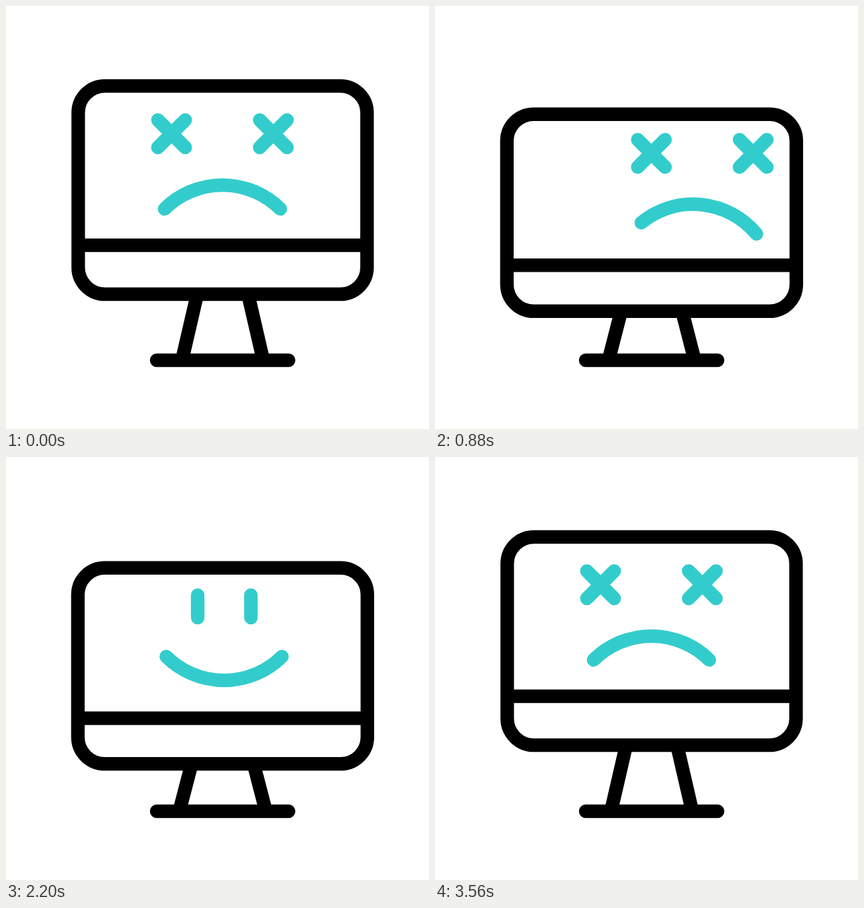
These frames come from a looping animation (640x640 px, 3600 ms). An HTML page with a canvas:

```html
<!DOCTYPE html>
<html lang="en">
<head>
<meta charset="utf-8">
<title>Computer mood</title>
<style>
  html, body { margin: 0; height: 100%; overflow: hidden; background: #fff; }
  canvas { display: block; width: 100vmin; height: 100vmin; }
</style>
</head>
<body>
<canvas width="640" height="640"></canvas>
<script>
const ctx = document.querySelector('canvas').getContext('2d');
const LOOP = 3600, TEAL = '#33cccc', CX = 327.75;
const RADIUS = 124.3, HALF_ANGLE = 0.781, FACE_GAP = 373;

// Centre lines of the strokes, plus the vertical shift of the face
const REST   = { width: 437,   top: 121,   bar: 362,   bottom: 436,   base: 536, hip: 38.4, foot: 61.5, face: 0 };
const SQUASH = { width: 438,   top: 168.6, bar: 395.8, bottom: 464.7, base: 536, hip: 47,   foot: 65.6, face: 33 };
const PEAK   = { width: 418.5, top: 100.7, bar: 340.5, bottom: 415,   base: 512, hip: 34.2, foot: 47.9, face: -17 };

const HOP = [[40, REST], [430, SQUASH], [626, PEAK], [822, SQUASH], [1120, REST]];
const SLIDE = [[623, 0], [1506, FACE_GAP], [2427, FACE_GAP], [3235, 0]];
const TILT = [[60, 0], [500, 7], [623, 7], [1506, 0], [2427, 0], [3120, 7.1], [3560, 0]];
const SMILE_SIZE = [[620, 0.68], [1580, 1]];

const clamp = (v, lo, hi) => Math.min(hi, Math.max(lo, v));
const mix = (a, b, k) => a + (b - a) * k;

// Eased position between keys: the two values around t and the blend
function between(keys, t) {
  let i = 0;
  while (i < keys.length - 2 && t > keys[i + 1][0]) i++;
  const [t0, a] = keys[i], [t1, b] = keys[i + 1];
  const x = clamp((t - t0) / (t1 - t0), 0, 1);
  return [a, b, x * x * (3 - 2 * x)];
}
const track = (keys, t) => mix(...between(keys, t));

function poseAt(t) {
  const [a, b, k] = between(HOP, t);
  return Object.fromEntries(Object.keys(a).map(key => [key, mix(a[key], b[key], k)]));
}

function line(x1, y1, x2, y2, cap = 'round') {
  ctx.lineCap = cap;
  ctx.beginPath();
  ctx.moveTo(x1, y1);
  ctx.lineTo(x2, y2);
  ctx.stroke();
}

function arc(x, y, r, middle) {
  ctx.lineCap = 'round';
  ctx.beginPath();
  ctx.arc(x, y, r, middle - HALF_ANGLE, middle + HALF_ANGLE);
  ctx.stroke();
}

function sadFace(tilt) {
  for (const x of [250.5, 404.5]) {
    line(x - 20.7, 172.6, x + 20.7, 214);
    line(x + 20.7, 172.6, x - 20.7, 214);
  }
  ctx.save();
  ctx.translate(327.5, 253);
  ctx.rotate(tilt * Math.PI / 180);
  arc(0, 142.2, RADIUS, -Math.PI / 2);
  ctx.restore();
}

function happyFace(size) {
  for (const x of [290, 370.5]) line(x, 176.5, x, 210.5);
  arc(330, 305.5 - RADIUS * size, RADIUS * size, Math.PI / 2);
}

function drawFaces(t, pose) {
  ctx.save();
  ctx.beginPath();
  ctx.rect(CX - pose.width / 2, pose.top, pose.width, pose.bar - pose.top);
  ctx.clip();
  ctx.strokeStyle = TEAL;
  ctx.translate(track(SLIDE, t), pose.face);
  sadFace(track(TILT, t));
  ctx.translate(-FACE_GAP, 0);
  happyFace(track(SMILE_SIZE, t));
  ctx.restore();
}

function drawMonitor({ width, top, bar, bottom, base, hip, foot }) {
  const left = CX - width / 2;
  ctx.strokeStyle = '#000';
  for (const side of [-1, 1]) line(CX + side * hip, bottom, CX + side * foot, base, 'butt');
  line(228, base, 427.5, base);
  line(left, bar, left + width, bar, 'butt');
  ctx.beginPath();
  ctx.roundRect(left, top, width, bottom - top, 40.5);
  ctx.stroke();
}

// A wavy trail: its tip rises from `from` to `to`, its tail follows later
function drawSmoke(t, x, crest, from, to, tipStart, tailStart) {
  const rise = start => clamp(from - 0.15 * (t - start), to, from);
  const tip = rise(tipStart), tail = rise(tailStart);
  if (tail - tip < 0.5) return;
  ctx.strokeStyle = TEAL;
  ctx.lineCap = ctx.lineJoin = 'round';
  ctx.beginPath();
  for (let y = tip; y < tail + 1; y++) {
    const yy = Math.min(y, tail);
    ctx.lineTo(x - 17.5 * Math.cos((yy - crest) / 62 * 2 * Math.PI), yy);
  }
  ctx.stroke();
}

function draw(t) {
  ctx.fillStyle = '#fff';
  ctx.fillRect(0, 0, 640, 640);
  ctx.lineWidth = 20.5;
  const pose = poseAt(t % (LOOP / 2));
  drawFaces(t, pose);
  drawMonitor(pose);
  drawSmoke(t, 352.5, 24, 87, -20, 2500, 2860);
  drawSmoke(t, 287.5, 77, 122, 45, 2700, 3040);
}

const start = performance.now();
function tick() {
  draw((performance.now() - start) % LOOP);
  requestAnimationFrame(tick);
}
tick();
</script>
</body>
</html>
```
